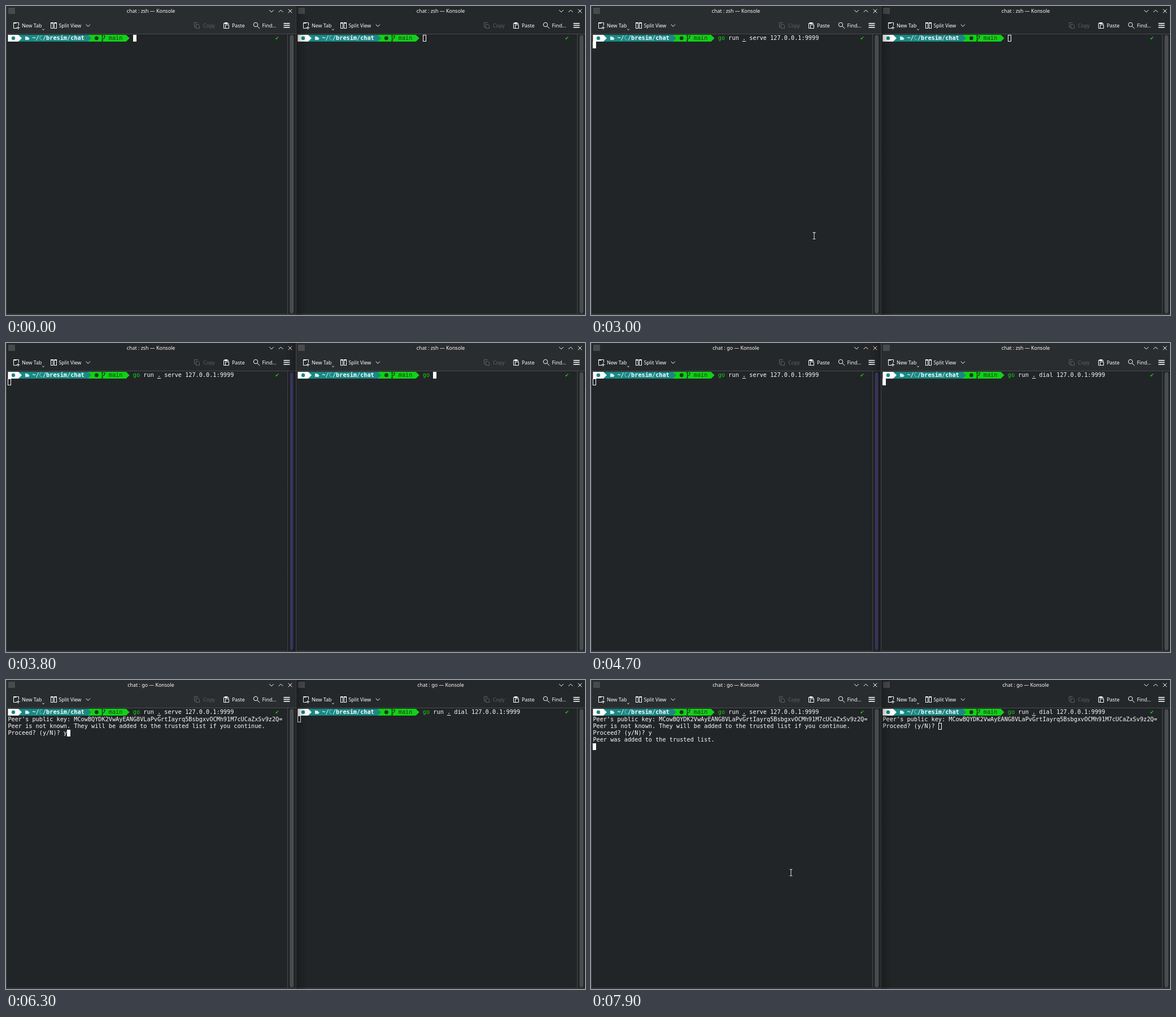
Recreate the animation shown at these times as an HTML page with a canvas. Size 1025 px wide and 547 px high, loop 8000 ms.

```html
<!DOCTYPE html>
<html lang="en">
<head>
<meta charset="utf-8">
<title>Two terminals</title>
<style>
html, body { margin: 0; width: 100%; height: 100%; overflow: hidden; background: #222527; }
canvas { display: block; width: 1025px; height: 547px; }
</style>
</head>
<body>
<canvas id="stage" width="1025" height="547"></canvas>
<script>
const ctx = document.getElementById('stage').getContext('2d');
const LOOP = 8000, STEP = 100;
const CELL = 6.152, ROW = 12.25, TOP = 51, PAD = 3.4;
const PANE = 513, HEIGHT = 547;
const MONO = '10.22px "DejaVu Sans Mono", monospace';
const UI = '8.9px "Noto Sans", sans-serif';
const BG = '#222527', WHITE = '#fcfcfc', GREEN = '#11d116', TEAL = '#198884';
const EDGE = '#484b4e', DIM = '#5f6265', PURPLE = '#574b91', PALE = '#d5eeee', INK = '#123b16';
const KEY = "Peer's public key: MCowBQYDK2VwAyEANG8VLaPvGrtIayrq5BsbgxvOCMh91M7cUCaZxSv9z2Q=";
const UNKNOWN = 'Peer is not known. They will be added to the trusted list if you continue.';
const PROCEED = 'Proceed? (y/N)? ';
const ADDED = 'Peer was added to the trusted list.';

const moves = [
  { start: 100, end: 700, hide: 1900, from: [638, 540], to: [370, 408] },
  { start: 2900, end: 3500, hide: 3800, from: [370, 408], to: [709, 392] },
  { start: 5000, end: 5800, hide: 6300, from: [640, 382], to: [324, 343] },
  { start: 7600, end: 7900, hide: LOOP, from: [324, 341], to: [354, 341] }
];

const ramp = (t, start, end) => Math.min(1, Math.max(0, (t - start) / (end - start)));
const ease = p => p * p * (3 - 2 * p);

function pointerAt(t) {
  const move = moves.find(m => t >= m.start && t < m.hide);
  if (!move) return null;
  const p = ease(ramp(t, move.start, move.end));
  return move.from.map((v, i) => v + (move.to[i] - v) * p);
}

function box(x, y, w, h, color) {
  ctx.fillStyle = color;
  ctx.fillRect(x, y, w, h);
}

function frame(x, y, w, h, color = WHITE) {
  ctx.strokeStyle = color;
  ctx.lineWidth = 1;
  ctx.strokeRect(x, y, w, h);
}

// Strokes an SVG path placed at (x, y).
function icon(path, x, y, color = WHITE, width = 1) {
  ctx.save();
  ctx.translate(x, y);
  ctx.strokeStyle = color;
  ctx.lineWidth = width;
  ctx.stroke(new Path2D(path));
  ctx.restore();
}

function disc(x, y, r, color) {
  ctx.fillStyle = color;
  ctx.beginPath();
  ctx.arc(x, y, r, 0, 7);
  ctx.fill();
}

function label(str, x, y, color = WHITE, align = 'left') {
  ctx.font = UI;
  ctx.textAlign = align;
  ctx.fillStyle = color;
  ctx.fillText(str, x, y);
}

// A positive height points down, a negative one up.
function chevron(x, y, w, h) {
  icon(`M${-w} ${-h}L0 ${h}L${w} ${-h}`, x, y);
}

const colX = col => PAD + col * CELL;
const rowY = row => TOP + row * ROW;

// Writes a run and returns the column after it.
function type(str, col, row = 0, color = WHITE, bold = false) {
  ctx.font = (bold ? 'bold ' : '') + MONO;
  ctx.textAlign = 'left';
  ctx.fillStyle = color;
  ctx.fillText(str, colX(col), rowY(row) + 9.3);
  return col + str.length;
}

function cursor(col, row, solid) {
  const x = Math.round(colX(col)), y = Math.round(rowY(row));
  if (solid) box(x, y, 6, 12, WHITE);
  else frame(x + .5, y + .5, 5, 11);
}

function segment(from, to, color) {
  const x = colX(from), tip = colX(to);
  ctx.fillStyle = color;
  ctx.fill(new Path2D(`M${x} ${TOP}H${tip}l${CELL} 6l${-CELL} 6H${x}Z`));
}

function folder(x, y) {
  ctx.fillStyle = PALE;
  ctx.fill(new Path2D(`M${x} ${y}h3l1 1h2v2h2l-2 3h-6Z`));
}

function branch(x, y) {
  icon('M0 0V9M0 6.5L4 4V1', x, y, INK, 1.2);
  for (const [dx, dy] of [[0, 0], [0, 9], [4, 1]]) disc(x + dx, y + dy, 1.3, INK);
}

function prompt() {
  segment(23, 34, GREEN);
  segment(3, 23, TEAL);
  segment(0, 3, WHITE);
  disc(13, 57, 3.2, TEAL);
  folder(34, 54);

  let col = type('~', 7, 0, WHITE, true);
  col = type('/', col, 0, PALE, true);
  col = type('C', col, 0, '#6fc5c3');
  col = type('/', col, 0, PALE, true);
  col = type('bresim', col, 0, WHITE, true);
  col = type('/', col, 0, PALE, true);
  type('chat', col, 0, WHITE, true);

  disc(160.3, 57, 3.4, INK);
  branch(170.5, 52.5);
  type('main', 29, 0, INK);
  type('✔', 77, 0, GREEN);
}

function command(str) {
  type(str.slice(0, 2), 36, 0, GREEN);
  type(str.slice(2), 38);
  if (str.length > 7) box(colX(43), TOP + 11, CELL, 1, WHITE);
}

function toolbar() {
  const base = 37.5;
  icon('M6 10H0V0H9V5M0 1H5M8 6V12M5 9H11', 13.5, 29.5);
  label('New Tab', 28, base);
  chevron(66, 41.7, 1.7, .8);

  for (const x of [79.5, 85.5]) {
    frame(x, 29.5, 4, 10);
    box(x, 29, 4, 2, WHITE);
  }
  label('Split View', 93.5, base);
  chevron(145.3, 34.5, 3.6, 1.8);

  icon('M2 8H0V0H6M3 3H7L9 5V10H3Z', 333.5, 29.5, DIM);
  label('Copy', 349, base, DIM);

  icon('M3 10H0V1H8V3M3 4H9V10H3Z', 385.5, 29.5);
  box(387, 29, 5, 3, WHITE);
  label('Paste', 400, base);

  icon('M7.4 4A3.7 3.7 0 1 0 0 4A3.7 3.7 0 1 0 7.4 4M6.4 6.7L11 11', 438.3, 29);
  label('Find...', 453.5, base);

  for (let i = 0; i < 3; i++) box(491.5, 30 + i * 3.5, 11, 1.6, WHITE);
}

function scrollbar(purple, focus) {
  box(498, 50, 1, 495, EDGE);
  ctx.globalAlpha = purple ? .65 + .35 * focus : 1;
  ctx.fillStyle = purple ? PURPLE : EDGE;
  ctx.beginPath();
  ctx.roundRect(503, 52, 5.5, 491.5, 2.7);
  ctx.fill();
  ctx.globalAlpha = 1;
  if (!purple) {
    ctx.strokeStyle = DIM;
    ctx.lineWidth = .7;
    ctx.stroke();
  }
}

function pane(x, focus, program, purple, content) {
  ctx.save();
  ctx.translate(x, 0);
  box(0, 0, PANE, HEIGHT, BG);
  box(0, 0, PANE, 49, `rgba(255,255,255,${.01 + .025 * focus})`);
  box(0, 49, PANE, 1, EDGE);
  box(4, 3, 12, 11, EDGE);
  label(`chat : ${program} — Konsole`, 256.5, 12.2, WHITE, 'center');
  chevron(470, 9, 3.8, 1.9);
  chevron(486.6, 9, 3.8, -1.9);
  icon('M-3.3 -3.3L3.3 3.3M3.3 -3.3L-3.3 3.3', 503, 9);
  toolbar();
  scrollbar(purple, focus);
  prompt();
  content();
  box(0, 545, PANE, 1, EDGE);
  box(0, 0, 1, 546, EDGE);
  ctx.restore();
}

function leftContent(t, active) {
  if (t < 1900) return cursor(36, 0, active);
  command('go run . serve 127.0.0.1:9999');
  if (t < 2400) return cursor(65, 0, active);
  if (t < 5000) return cursor(0, 1, active);
  type(KEY, 0, 1);
  type(UNKNOWN, 0, 2);
  const end = type(PROCEED + (t < 6300 ? '' : 'y'), 0, 3);
  if (t < 7200) return cursor(end, 3, active);
  if (t < 7300) return cursor(0, 4, active);
  type(ADDED, 0, 4);
  cursor(0, 5, active);
}

function rightContent(t, active) {
  const text = 'go run . dial 127.0.0.1:9999';
  const typed = Math.round(text.length * ramp(t, 3700, 4600));
  command(text.slice(0, typed));
  if (t < 4700) return cursor(36 + typed, 0, active);
  if (t < 7300) return cursor(0, 1, active);
  type(KEY, 0, 1);
  cursor(type(PROCEED, 0, 2), 2, active);
}

// A focused window drops a soft shadow on its neighbour.
function shadow(direction, strength) {
  const end = PANE + direction * 20;
  const fade = ctx.createLinearGradient(PANE, 0, end, 0);
  fade.addColorStop(0, `rgba(0,0,0,${.25 * strength})`);
  fade.addColorStop(1, 'rgba(0,0,0,0)');
  box(Math.min(PANE, end), 0, 20, HEIGHT, fade);
}

function pointer([x, y]) {
  const beam = 'M0 -5.5V5.5M-2.5 -5.7H2.5M-2.5 5.7H2.5';
  icon(beam, x, y, '#000', 2.4);
  icon(beam, x, y, WHITE, 1.1);
}

function draw(t) {
  const rightActive = t >= 3200 && t < 5600;
  const focus = ramp(t, 3300, 3500) - ramp(t, 5500, 5700);
  const spot = pointerAt(t);
  const hovered = spot && Math.abs(spot[0] - 505) < 6;
  const purple = hovered || (t >= 3100 && t < 5600);

  pane(0, 1 - focus, t < 4000 ? 'zsh' : 'go', purple, () => leftContent(t, !rightActive));
  pane(PANE, focus, t < 4800 ? 'zsh' : 'go', false, () => rightContent(t, rightActive));
  shadow(1, 1 - focus);
  shadow(-1, focus);
  if (spot) pointer(spot);
}

const start = performance.now();
function tick() {
  const t = (performance.now() - start) % LOOP;
  draw(Math.floor(t / STEP) * STEP);
  requestAnimationFrame(tick);
}
tick();
</script>
</body>
</html>
```
